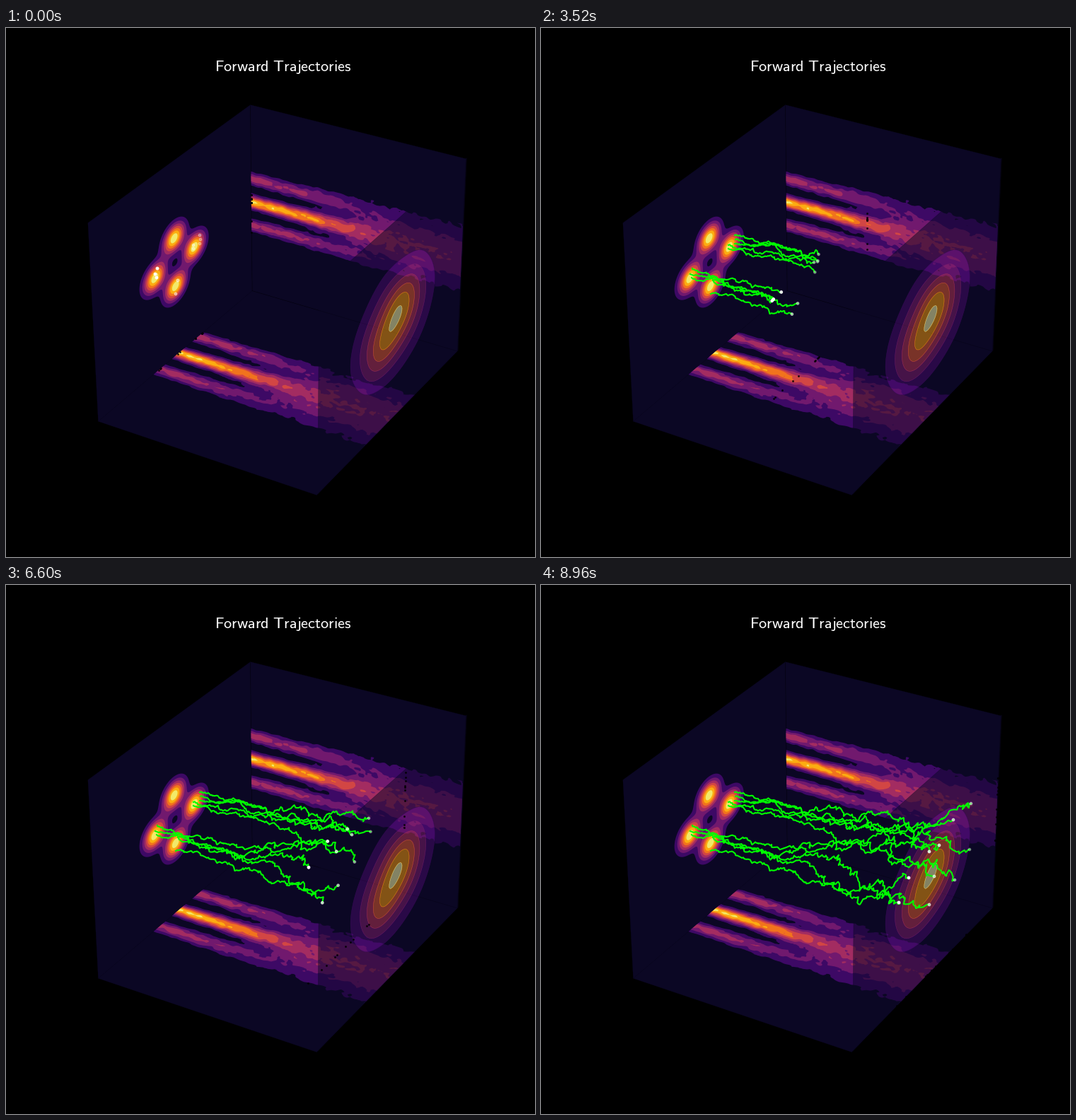
A matplotlib script for the animation above (8980 ms loop, 748 by 748 pixels).

```python
import numpy as np
import matplotlib.pyplot as plt
from matplotlib.animation import FuncAnimation

SIZE = 748
TICK = 20
TICKS = 449
STEPS = 193

plt.rcParams["mathtext.fontset"] = "cm"
inferno = plt.get_cmap("inferno")
rng = np.random.default_rng(7)

# Box corners (time, y, z) in -1..1 and where they land on the stage.
CORNERS = {
    (-1, 1, 1): (346, 109), (-1, -1, 1): (116, 275),
    (-1, -1, -1): (130, 556), (-1, 1, -1): (348, 372),
    (1, 1, 1): (650, 184), (1, 1, -1): (638, 457),
    (1, -1, -1): (440, 660), (1, -1, 1): (441, 371),
}


def fit_camera():
    rows = []
    for corner, (u, v) in CORNERS.items():
        p = np.array([*corner, 1.0])
        o = np.zeros(4)
        rows.append(np.concatenate([p, o, -u / SIZE * p]))
        rows.append(np.concatenate([o, p, -v / SIZE * p]))
    cam = np.linalg.svd(np.array(rows))[2][-1].reshape(3, 4)
    cam[:2] *= SIZE
    return cam * np.sign(cam[2, 3])


CAM = fit_camera()


def project(t, y, z):
    """Time 0..1 and y, z in -4..4 to stage x, y and depth."""
    t, y, z = np.broadcast_arrays(t, y, z)
    pts = np.stack([2 * t - 1, y / 4, z / 4, np.ones(t.shape)])
    u, v, w = np.tensordot(CAM, pts, 1)
    return u / w, v / w, w


def unproject(u, v, t):
    """The y, z that show up at stage point u, v at time t."""
    a = np.array([CAM[0] - u * CAM[2], CAM[1] - v * CAM[2]])
    return 4 * np.linalg.solve(a[:, 1:3], -a[:, 0] * (2 * t - 1) - a[:, 3])


def bands(n):
    return [inferno((i + 0.5) / n) for i in range(n)]


def smooth_noise(shape, across, along):
    f = rng.normal(size=shape)
    for axis, k in ((0, across), (1, along)):
        f = np.apply_along_axis(np.convolve, axis, f, k, mode="same")
    return f / f.std()


fig = plt.figure(figsize=(SIZE / 100, SIZE / 100), dpi=100, facecolor="black")
ax = fig.add_axes([0, 0, 1, 1])
ax.set_xlim(0, SIZE)
ax.set_ylim(SIZE, 0)
ax.axis("off")

PALETTE = bands(8)


def wall(*corners):
    u, v, _ = project(*np.array(corners, float).T)
    ax.fill(u, v, color=PALETTE[0], lw=0.2, zorder=1)


def edge(a, b):
    u, v, _ = project(*np.array([a, b], float).T)
    ax.plot(u, v, color="black", lw=0.4, alpha=0.5, zorder=1)


def heat(u, v, f, step):
    for i in range(1, 8):
        if f.max() > i * step:
            ax.contourf(u, v, f, levels=[i * step, 1e3], colors=[PALETTE[i]],
                        antialiased=True, zorder=1)


def gauss(x, var):
    return np.exp(-x**2 / (2 * var)) / np.sqrt(2 * np.pi * var)


def marginal(t, x):
    """Three modes that diffuse into one, with sampling noise."""
    noise = 0.04 * t + 0.88 * t**4
    a = np.sqrt(1 - noise)
    var = 0.185**2 * a**2 + noise
    p = sum(w * gauss(x - a * m, var) for w, m in ((0.25, -1), (0.5, 0), (0.25, 1)))
    grain = smooth_noise(p.shape, [1, 2, 1], [1, 2, 3, 2, 1])
    return p + 0.02 * np.sqrt(p / 0.15) * grain


# Walls
wall((0, -4, -4), (0, 4, -4), (0, 4, 4), (0, -4, 4))
wall((0, 4, -4), (1, 4, -4), (1, 4, 4), (0, 4, 4))
wall((0, -4, -4), (1, -4, -4), (1, 4, -4), (0, 4, -4))
edge((0, 4, 4), (0, 4, -4))
edge((0, 4, -4), (1, 4, -4))

# Marginals over time on the back wall and the floor
T, X = np.meshgrid(np.linspace(0, 1, 130), np.linspace(-2.6, 2.6, 95))
u, v, _ = project(T, 4.0, X - 0.08)
heat(u, v, marginal(T, X), 0.15)
u, v, _ = project(T, X, -4.0)
heat(u, v, marginal(T, X), 0.15)

# Four modes at the start
Y, Z = np.meshgrid(np.linspace(-2.3, 2.3, 100), np.linspace(-2.3, 2.3, 100))
modes = sum(np.exp(-((Y - a)**2 + (Z - b)**2) / (2 * 0.372**2))
            for a, b in ((1, 0), (-1, 0), (0, 1), (0, -1)))
u, v, _ = project(0.0, Y - 0.07, Z - 0.08)
heat(u, v, modes, 0.128)

# See-through density at the end, its core stretched along the diagonal
Y, Z = np.meshgrid(np.linspace(-4, 4, 80), np.linspace(-4, 4, 80))
r2 = Y**2 + Z**2
bend = 0.8 * Y * Z * np.exp(-r2 / 3)
ripple = 0.025 * np.sin(2.3 * Y + 1.4 * Z) + 0.025 * np.cos(1.9 * Z - 2.6 * Y)
end = 0.122 * np.exp(-(r2 - bend) / (2 * 1.22**2)) * (1 + ripple)
u, v, _ = project(1.0, Y + 0.05, Z)
cs = ax.contourf(u, v, end, levels=[-1] + [0.02 * i for i in range(1, 8)],
                 colors=[PALETTE[0], *bands(7)[1:6], inferno(1.0)],
                 alpha=0.5, antialiased=True, zorder=1)
cs.set_edgecolor("face")
cs.set_linewidth(0.4)

ax.text(391.5, 61, r"$\mathsf{Forward\ Trajectories}$", color="white",
        fontsize=16, ha="center", va="baseline")

# Where each trajectory starts and ends on the stage
STARTS = [(274, 293), (275, 299), (274, 305), (265, 307), (265, 312),
          (214, 340), (211, 348), (213, 353), (243, 357), (240, 376)]
ENDS = [(608, 309), (583, 332), (606, 374), (585, 417), (549, 377),
        (563, 368), (556, 412), (520, 414), (549, 452), (506, 449)]
times = np.linspace(0, 1, STEPS)


def walk(start, end):
    """Random walk pinned at both ends, rougher as time goes on."""
    a, b = unproject(*start, 0)[:, None], unproject(*end, 1)[:, None]
    sd = 0.02 + 0.06 * times**1.4
    sd[0] = 0
    spread = np.cumsum(sd**2)
    w = np.cumsum(rng.normal(size=(2, STEPS)) * sd, axis=1)
    w -= w[:, -1:] * spread / spread[-1]
    return a + (b - a) * times**2.2 + w


ys, zs = np.array([walk(a, b) for a, b in zip(STARTS, ENDS)]).transpose(1, 0, 2)
px, py, depth = project(times, ys, zs)
back = project(times, 4.0, zs)
floor = project(times, ys, -4.0)

lines = [ax.plot([], [], color="lime", lw=1.5, zorder=4)[0] for _ in STARTS]
shadows = ax.scatter([], [], s=1, color="black", lw=1.2, alpha=0.7, zorder=3)
dots = ax.scatter([], [], s=7, color="white", lw=0.8, zorder=5)


def step_at(tick):
    """Steps come in threes: two short ones and a long one."""
    group, part = divmod(tick + 1, 7)
    return 3 * group + min(part, 2) - 1


def draw(tick):
    k = step_at(tick)
    for line, x, y in zip(lines, px, py):
        line.set_data(x[:k + 1], y[:k + 1])
    shadows.set_offsets(np.vstack([np.c_[s[0][:, k], s[1][:, k]] for s in (back, floor)]))
    dots.set_offsets(np.c_[px[:, k], py[:, k]])
    d = depth[:, k]
    rgba = np.ones((len(d), 4))
    rgba[:, 3] = 1 - 0.7 * (d - d.min()) / np.ptp(d)
    dots.set_color(rgba)
    return [*lines, shadows, dots]


anim = FuncAnimation(fig, draw, frames=TICKS, interval=TICK, repeat=True,
                     repeat_delay=0, blit=False)
plt.show()
```
